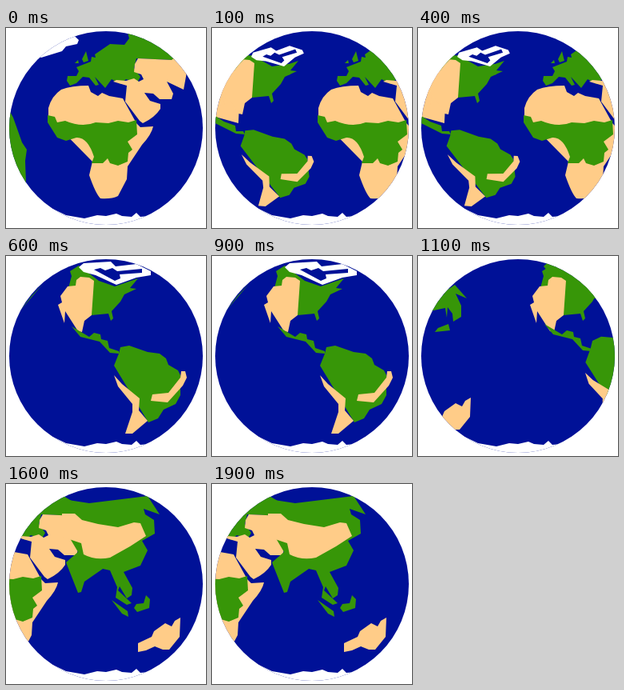
An HTML page that plays this animation: 250x250 px, repeating every 2.1 s.

```html
<!DOCTYPE html>
<html>
<head>
<meta charset="utf-8">
<style>
html, body { margin: 0; width: 100%; height: 100%; overflow: hidden; background: #fff; }
svg { display: block; width: 100vw; height: 100vh; }
.ocean { fill: #001197; }
.land { fill: #379608; }
.desert { fill: #ffcc88; }
.ice { fill: #fff; }
</style>
</head>
<body>
<svg viewBox="0 0 250 250">
<defs>
<clipPath id="globe"><circle cx="125" cy="125" r="121"/></clipPath>

<g id="africa">
  <path class="land" d="M76 66L77 60 88 60 91 54 88 49 106 42 107 36 112 37 111 33 130 20 148 21 154 13 152 6 165 0 225 35 209 40 163 38 160 50 168 61 164 68 150 64 143 70 132 64 124 75 111 61 116 71 112 72 104 62 96 61 88 69 80 72Z"/>
  <path class="land" d="M95 39L100 29 103 41 97 43ZM86 44L90 40 91 44Z"/>
  <path class="desert" d="M161 45L165 38 207 40 212 36 226 55 222 77 201 67 209 82 207 89 192 89 184 82 173 81 180 91 193 95 193 101Q186 112 171 119L167 116 149 92 151 72 134 67 138 65 150 66 160 63 166 67 172 64 169 58 160 55Z"/>
  <path class="desert" d="M53 111V100Q57 85 69 77Q82 72 103 72L106 80 115 85 120 81 129 85 146 88 163 119 168 124 184 123Q182 133 170 146L152 173 151 189 140 210Q132 214 118 213Q112 207 104 184L108 167Z"/>
  <path class="land" d="M52 109L61 111 64 118 74 116Q95 125 112 118L128 119 140 116 153 118 163 115 164 133 152 142 158 152 153 156 152 167 140 172 130 169 127 163 121 169 107 169 110 161Q102 136 88 137L75 141 64 137 52 118Z"/>
</g>

<g id="northAmerica">
  <path class="land" d="M78 40L82 25 80 19 91 12 116 31 136 38 165 28 155 40 163 41 148 48 143 57 132 69 134 78 131 81 128 72 107 74 103 40Z"/>
  <path class="desert" d="M71 46L77 38 87 37 88 30 93 26 104 27 110 31 107 74 98 81 95 95 90 94 74 69 73 84 65 61 70 58 68 50Z"/>
</g>

<path id="isthmus" class="land" d="M82 88L104 101 110 96 118 98 119 104 127 106 129 115 141 119V122L130 121 117 107 93 101Z"/>

<g id="arctic">
  <path class="ice" d="M91 14L97 9 131 7 137 13 163 10 181 19V24L163 27 138 36 112 24 97 20Z"/>
  <path class="ocean" d="M110 17L118 15 124 18 133 15 139 19 170 16V21L142 23 143 28 136 31Z"/>
</g>

<g id="southAmerica">
  <path class="land" d="M135 137L141 122 143 114 154 112 177 120 192 122 200 128 203 136 215 143 218 149V174L212 185 197 192 190 203 178 208Z"/>
  <path class="desert" d="M219 144H224L226 152 221 162 202 183 181 181 183 173 203 171 218 152ZM135 149L145 160 167 178 166 193 177 206 158 222H149L158 195V185L140 163Z"/>
</g>

<path id="australia" class="desert" d="M165 199L182 191 185 184 199 174 207 178 211 171 218 167 217 191 204 207H196L186 203 175 208 165 210Z"/>
</defs>

<g clip-path="url(#globe)">
<rect class="ocean" width="250" height="250"/>

<g class="view">
  <path class="ice" d="M30 30L44 37 70 29 75 23 89 20 91 15 75 0Z"/>
  <path class="land" d="M0 95L9 112 20 143 26 152 24 166 25 194H0Z"/>
  <use href="#africa"/>
</g>

<g class="view">
  <path class="desert" d="M0 110V80L34 38 44 37 52 43 48 87 34 97 33 119Z"/>
  <path class="land" d="M20 45L40 36 50 34 75 48 96 45 98 58 52 70V43Z"/>
  <use href="#northAmerica" transform="translate(-57 13)"/>
  <path class="land" d="M0 107L15 117 29 122 30 129H39L41 133 30 132 0 117Z"/>
  <use href="#arctic" transform="matrix(.687 -.142 .396 .849 -19 37)"/>
  <use href="#southAmerica" transform="matrix(.992 .072 .098 .868 -111.7 18.9)"/>
  <use href="#africa" x="80"/>
</g>

<g class="view">
  <path class="land" d="M18 68L46 35 32 50Z"/>
  <use href="#northAmerica"/>
  <use href="#isthmus"/>
  <use href="#arctic"/>
  <use href="#southAmerica"/>
</g>

<g class="view">
  <path class="land" d="M36 43L46 36 61 53 47 47 54 62V76L44 82 43 72 37 64 36 77 34 65 15 69ZM21 95L25 90 38 85 40 93Z"/>
  <path class="land" d="M157 13L170 0 230 55 185 45Z"/>
  <use href="#australia" x="-152" y="10"/>
  <use href="#northAmerica" x="75"/>
  <use href="#isthmus" x="76" y="-3"/>
  <use href="#southAmerica" transform="matrix(.996 -.288 -.03 1.077 79 24.4)"/>
</g>

<g class="view">
  <use href="#africa" x="-119"/>
  <path class="land" d="M78 20L104 24 177 15 192 38 172 31 174 38 185 45 186 62 170 71 177 83 168 102 147 110 158 130 157 139 151 143 142 128 140 133 157 149 151 151 137 142 139 129 130 108 121 106 98 122 94 135 90 136 75 98 90 85 80 68 88 50Z"/>
  <path class="desert" d="M70 37H86L95 45 115 50 140 54 160 48 168 49 175 65 155 78 130 92Q112 96 97 88L94 74 70 66Z"/>
  <path class="land" d="M132 145L152 159 153 166 145 162ZM160 155L163 150 172 149 175 139 180 144 179 155 164 160Z"/>
  <use href="#australia"/>
</g>

<path class="ice" d="M50 222L75 234 98 238 114 234 125 235 138 232 145 235 157 236 163 231 168 236 178 235 195 227V250H50Z"/>
</g>
</svg>
<script>
const views = document.querySelectorAll('.view');
const starts = [0, 100, 600, 1100, 1600];
const loop = 2100;

function draw(now) {
  const time = now % loop;
  const current = starts.filter(start => start <= time).length - 1;
  views.forEach((view, i) => view.style.display = i === current ? 'inline' : 'none');
  requestAnimationFrame(draw);
}
draw(performance.now());
</script>
</body>
</html>
```
